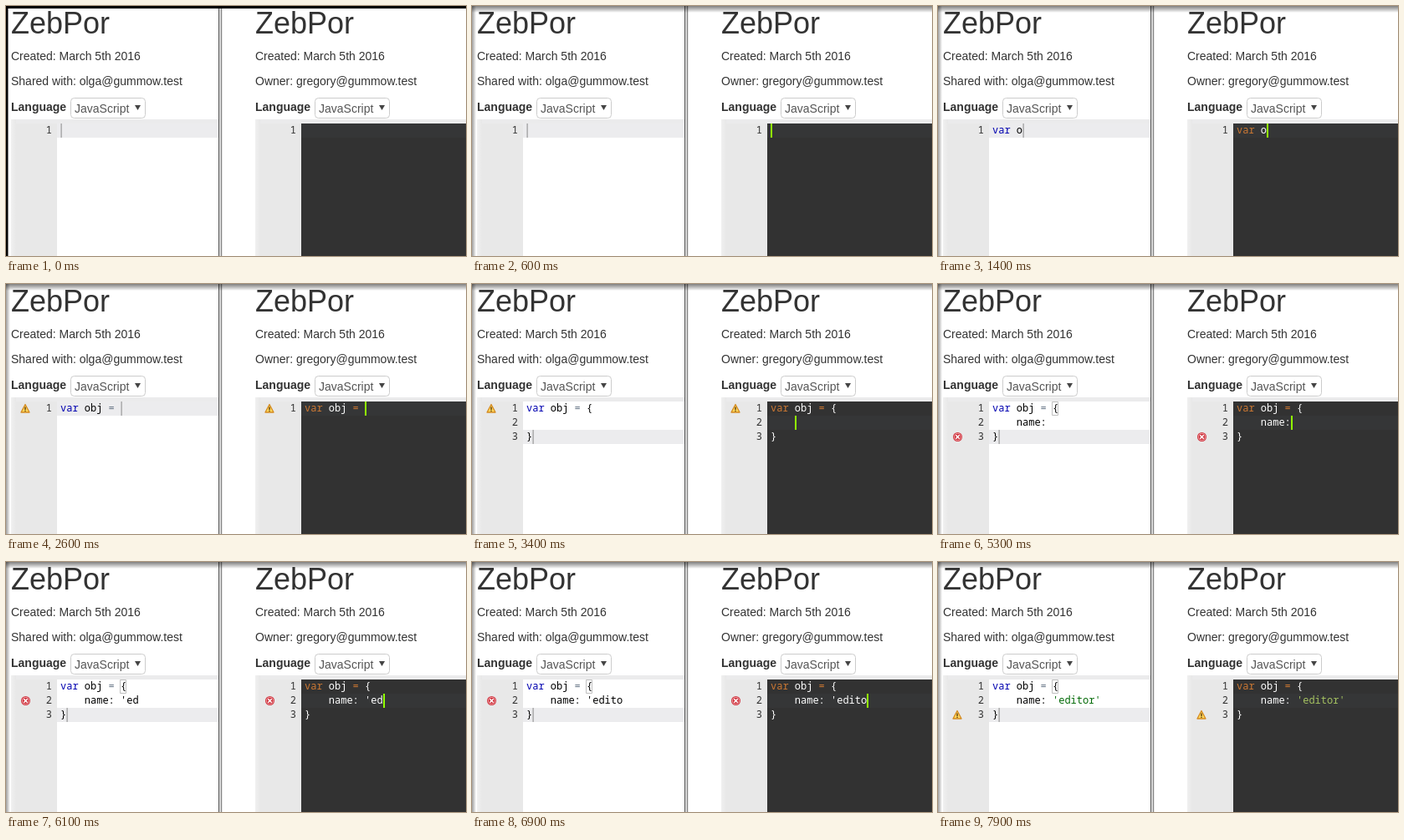
An HTML page with a canvas that plays this animation: 550 by 300 pixels, repeating every 8 s.

```html
<!DOCTYPE html>
<html lang="en">
<head>
<meta charset="utf-8">
<title>Shared editor</title>
<style>
html, body { margin: 0; width: 100%; height: 100%; overflow: hidden; background: #fff; }
canvas { display: block; width: 550px; height: 300px; }
</style>
</head>
<body>
<canvas id="stage" width="550" height="300"></canvas>
<script>
const ctx = document.getElementById('stage').getContext('2d');
const LOOP = 8000, ROW = 17, TOP = 141, CHAR = 7.2;
const SANS = '"Liberation Sans", Arial, sans-serif';
const MONO = '12px "Noto Sans Mono", monospace';

const KEYS = [
  [700, 'v'], [900, 'a'], [1000, 'r'], [1200, ' '], [1400, 'o'], [1500, 'b'], [1700, 'j'],
  [1800, ' '], [2100, '='], [2300, ' '], [2900, '{'], [3300, '\n'],
  [3900, 'n'], [4100, 'a'], [4300, 'm'], [4500, 'e'], [4800, ':'], [5400, ' '], [5500, "'"],
  [5900, 'e'], [6100, 'd'], [6300, 'i'], [6500, 't'], [6700, 'o'], [7000, 'r'], [7200, "'"]
];
const MARKERS = [
  [0, null, 0], [2200, 'warning', 0], [4400, 'error', 2], [5700, 'error', 1], [7700, 'warning', 2]
];
const BRACKET_AT = 3500, FOCUS_AT = 400, SHADOW_AT = 100;

const PANES = [
  { x: 0, right: 254, access: 'Shared with: olga@gummow.test', paper: '#fff', active: '#ececee',
    ink: '#000', keyword: '#0000b0', operator: '#687687', string: '#036a07' },
  { x: 292, right: 550, access: 'Owner: gregory@sample.test'.replace('sample', 'gummow'), paper: '#323232', active: '#353637',
    ink: '#fff', keyword: '#cc7833', operator: '#cc7833', string: '#a5c261', owner: true }
];

function rect(color, x, y, w, h) {
  ctx.fillStyle = color;
  ctx.fillRect(x, y, w, h);
}

function text(str, x, y, font, color) {
  ctx.font = font;
  ctx.fillStyle = color;
  ctx.fillText(str, x, y);
}

function polygon(points, color) {
  ctx.beginPath();
  points.forEach(([x, y]) => ctx.lineTo(x, y));
  ctx.closePath();
  ctx.fillStyle = color;
  ctx.fill();
}

function fade(x, y, w, h, dx, dy, from, to) {
  const gradient = ctx.createLinearGradient(x, y, x + dx, y + dy);
  gradient.addColorStop(0, from);
  gradient.addColorStop(1, to);
  rect(gradient, x, y, w, h);
}

// Document, caret and last key time at time t.
function editorState(t) {
  const typed = KEYS.filter(([at]) => at <= t);
  const lines = typed.map(([, key]) => key).join('').split('\n');
  if (lines.length > 1) lines[1] = '    ' + lines[1];
  const row = lines.length - 1, caret = { row, col: lines[row].length };
  if (row) lines.push('}');
  else if (lines[0].endsWith('{')) lines[0] += '}';
  const last = typed.length ? typed[typed.length - 1][0] : FOCUS_AT;
  return { lines, caret, last };
}

function drawMarker(kind, cx, cy) {
  if (kind === 'warning') {
    ctx.lineJoin = 'round';
    polygon([[cx, cy - 5], [cx + 5, cy + 4.5], [cx - 5, cy + 4.5]], '#ffd75a');
    ctx.strokeStyle = '#d48a22';
    ctx.lineWidth = 1.3;
    ctx.stroke();
    rect('#5a3c10', cx - 0.7, cy - 2, 1.4, 3.5);
    rect('#5a3c10', cx - 0.7, cy + 2.2, 1.4, 1.3);
  } else if (kind === 'error') {
    ctx.beginPath();
    ctx.arc(cx + 0.5, cy, 5.5, 0, Math.PI * 2);
    ctx.fillStyle = '#d0343f';
    ctx.fill();
    ctx.beginPath();
    ctx.arc(cx + 0.5, cy, 4.1, 0, Math.PI * 2);
    ctx.strokeStyle = '#f3b5b8';
    ctx.lineWidth = 0.8;
    ctx.stroke();
    ctx.beginPath();
    for (const s of [-1, 1]) {
      ctx.moveTo(cx - 1.7, cy - 2.2 * s);
      ctx.lineTo(cx + 2.7, cy + 2.2 * s);
    }
    ctx.strokeStyle = '#fff';
    ctx.lineWidth = 1.5;
    ctx.stroke();
  }
}

function drawHeader(pane) {
  const x = pane.x + 6;
  text('ZebPor', x, 33, '36px ' + SANS, '#333');
  text('Created: March 5th 2016', x, 65, '14px ' + SANS, '#333');
  text(pane.access, x, 95, '14px ' + SANS, '#333');
  text('Language', x, 126, 'bold 14px ' + SANS, '#333');
  ctx.beginPath();
  ctx.roundRect(x + 71.5, 110.5, 89, 24, 4);
  ctx.strokeStyle = '#ccc';
  ctx.lineWidth = 1;
  ctx.stroke();
  text('JavaScript', x + 76, 128, '14px ' + SANS, '#555');
  polygon([[x + 148, 119], [x + 155, 119], [x + 151.5, 125]], '#444');
}

function drawCode(pane, line, row) {
  const tokens = line.match(/'[^']*'|\bvar\b|=|\S/g) || [];
  let col = 0;
  for (const token of tokens) {
    col = line.indexOf(token, col);
    const color = token === 'var' ? pane.keyword
      : token === '=' ? pane.operator
      : token.length > 1 ? pane.string : pane.ink;
    text(token, pane.x + 65 + col * CHAR, TOP + 12 + row * ROW, MONO, color);
    col += token.length;
  }
}

function drawEditor(pane, t, state) {
  const { lines, caret, last } = state;
  const textX = pane.x + 65, lastRow = lines.length - 1;
  const spot = pane.owner ? caret : { row: lastRow, col: lines[lastRow].length };

  rect(pane.paper, pane.x + 61, TOP, pane.right - pane.x - 61, 300 - TOP);
  rect(pane.active, pane.x + 61, TOP + spot.row * ROW, pane.right - pane.x - 61, ROW);
  rect('#ebebec', pane.x + 6, 136, pane.right - pane.x - 6, 5);
  rect('#e8e8e8', pane.x + 6, TOP, 55, 300 - TOP);
  fade(pane.x + 6, 136, 6, 164, 6, 0, '#f0f0f0', '#e8e8e8');

  lines.forEach((line, row) => {
    text(row + 1, pane.x + 47.8, TOP + 12 + row * ROW, MONO, '#333');
    drawCode(pane, line, row);
  });

  const [, kind, markerRow] = MARKERS.filter(([at]) => at <= t).pop();
  drawMarker(kind, pane.x + 23, TOP + 8.5 + markerRow * ROW);

  const caretX = Math.round(textX + spot.col * CHAR), caretY = TOP + spot.row * ROW;
  if (!pane.owner) {
    if (t >= BRACKET_AT) {
      ctx.strokeStyle = '#c0c0c0';
      ctx.lineWidth = 1;
      ctx.strokeRect(textX + 10 * CHAR - 0.5, TOP + 0.5, 7, 16);
    }
    rect('#999', caretX + 0.5, caretY, 1.2, ROW);
  } else if (t >= FOCUS_AT && (t - last) % 1000 < 600) {
    rect('#91ff00', caretX, caretY, 2, ROW);
  }
}

function drawFrame(t) {
  rect('#fff', 0, 0, 550, 300);
  const state = editorState(t);
  for (const pane of PANES) {
    drawHeader(pane);
    drawEditor(pane, t, state);
  }
  rect('#555', 254, 0, 1, 300);
  rect('#d8d8d8', 255, 0, 2, 300);
  rect('#858585', 257, 0, 1, 300);
  rect('#e2e2e2', 258, 0, 1, 300);
  if (t < SHADOW_AT) {
    rect('#000', 0, 0, 550, 3);
    rect('#000', 0, 0, 2.5, 300);
  } else {
    fade(0, 0, 550, 8, 0, 8, 'rgba(0,0,0,.5)', 'rgba(0,0,0,0)');
    fade(0, 0, 5, 300, 5, 0, 'rgba(0,0,0,.38)', 'rgba(0,0,0,0)');
  }
}

function tick() {
  drawFrame(performance.now() % LOOP);
  requestAnimationFrame(tick);
}
tick();
</script>
</body>
</html>
```
